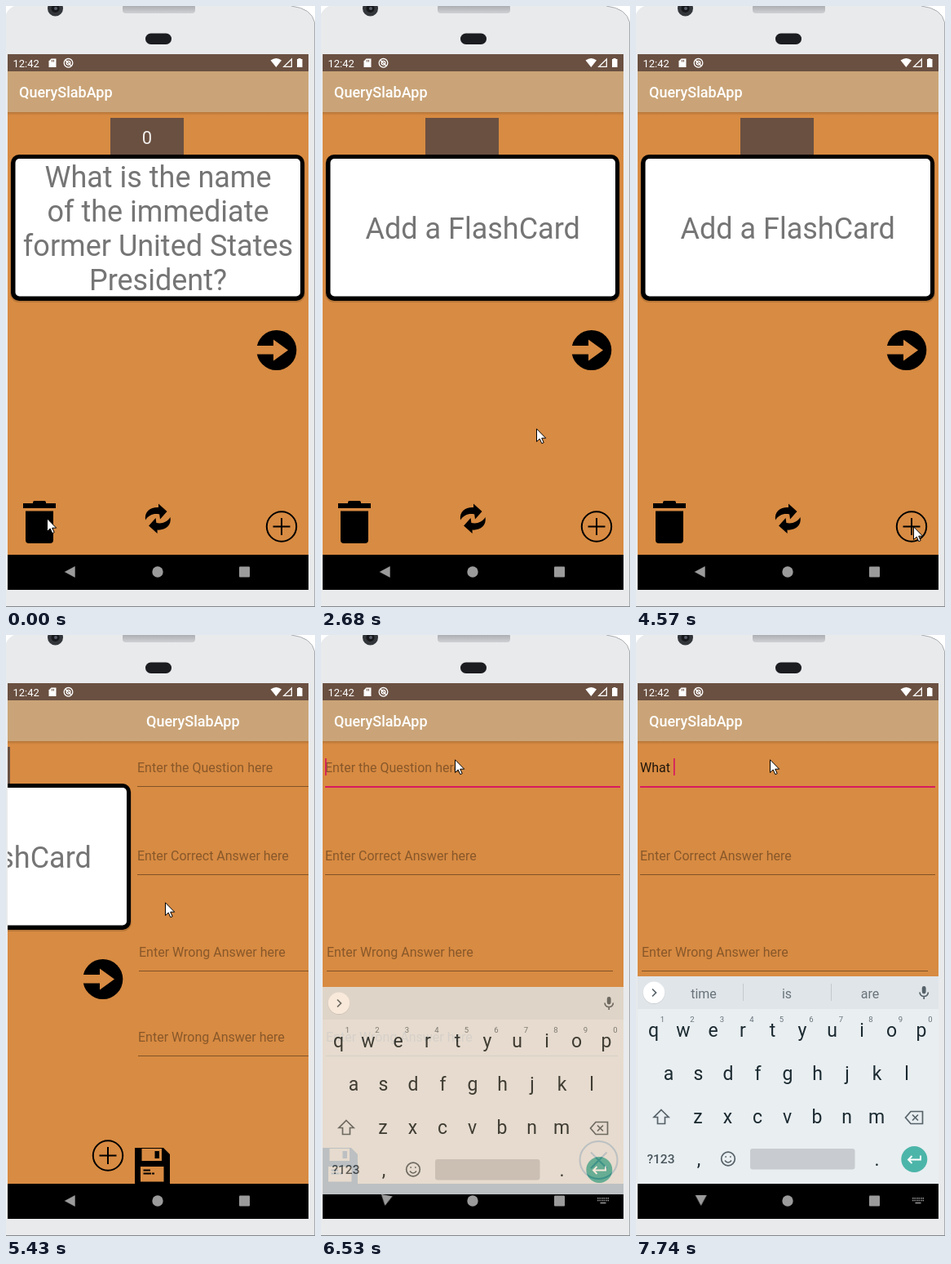
Recreate the animation shown at these times as an HTML page. Size 379 px wide and 736 px high, loop 8000 ms.

```html
<!DOCTYPE html>
<html lang="en">
<head>
<meta charset="utf-8">
<title>Card quiz demo</title>
<style>
html, body { margin: 0; width: 100%; height: 100%; overflow: hidden; background: #fff; }
#stage { display: block; width: 379px; height: 736px; font-family: Roboto, sans-serif; }
text { white-space: pre; }
.mid { text-anchor: middle; }
.bar { font-size: 18px; font-weight: 500; fill: #fff; }
.big { font-size: 36px; fill: #757575; text-anchor: middle; }
.hint { font-size: 16px; fill: rgba(0,0,0,.37); }
.typed { font-size: 16px; fill: #21170c; }
.line { stroke: rgba(0,0,0,.4); }
.ink { fill: none; stroke: #000; stroke-width: 2; }
.key { font-size: 23px; fill: #1b2a31; text-anchor: middle; }
.num { font-size: 9.5px; fill: #68747b; text-anchor: middle; }
.word { font-size: 16px; fill: #68737a; text-anchor: middle; }
.glyph { fill: none; stroke: #566269; stroke-width: 1.7; }

.question, .add, .home, .form, .focus, .caret, .rows, .board, .back, .picker, .cursor {
  animation: 8s step-end infinite;
}
.question { animation-name: question; }
.add { animation-name: add; }
.home { animation-name: home; }
.form { animation-name: form; }
.focus { animation-name: focus; }
.caret { animation-name: caret; }
.rows { animation-name: rows; }
.board { animation-name: board; }
.back { animation-name: back; }
.picker { animation-name: picker; }
.cursor { animation-name: cursor; }

@keyframes question { 0% { opacity: 1 } 5%, 100% { opacity: 0 } }
@keyframes add { 0% { opacity: 0 } 5%, 100% { opacity: 1 } }
@keyframes home {
  0% { transform: translateX(0) }
  66% { transform: translateX(-26px) }
  67.875% { transform: translateX(-213px) }
  69.375% { transform: translateX(-349px) }
  71.375%, 100% { transform: translateX(-380px) }
}
@keyframes form {
  0% { transform: translateX(380px) }
  66% { transform: translateX(343px) }
  67.875% { transform: translateX(156px) }
  69.375% { transform: translateX(20px) }
  71.375%, 100% { transform: translateX(0) }
}
@keyframes focus { 0% { opacity: 0 } 79.75%, 100% { opacity: 1 } }
@keyframes caret {
  0% { transform: translateX(0); opacity: 1 }
  85% { transform: translateX(0); opacity: 0 }
  88.375% { transform: translateX(14.2px); opacity: 1 }
  89.875% { transform: translateX(23px); opacity: 1 }
  91.375% { transform: translateX(31.7px); opacity: 1 }
  92.875% { transform: translateX(36.9px); opacity: 1 }
  96.75%, 100% { transform: translateX(41px); opacity: 1 }
}
/* both the typed text and the suggestions are stacked 40px apart */
@keyframes rows {
  0% { transform: translateY(0) }
  88.375% { transform: translateY(-40px) }
  89.875% { transform: translateY(-80px) }
  91.375% { transform: translateY(-120px) }
  92.875% { transform: translateY(-160px) }
  96.75%, 100% { transform: translateY(-200px) }
}
@keyframes board {
  0% { transform: translateY(13px); opacity: 0 }
  81.625% { transform: translateY(13px); opacity: .81 }
  83.5% { transform: translateY(1px); opacity: .98 }
  85%, 100% { transform: translateY(0); opacity: 1 }
}
@keyframes back {
  0% { transform: rotate(0) }
  81.625% { transform: translate(1px,-1px) rotate(-80deg) }
  83.5% { transform: translate(1px,-1px) rotate(-89deg) }
  85%, 100% { transform: translate(1px,-1px) rotate(-90deg) }
}
@keyframes picker { 0% { opacity: 0 } 81.625%, 100% { opacity: 1 } }
@keyframes cursor {
  0% { transform: translate(50px,627px) }
  10.375% { transform: translate(285px,592px) }
  12.375% { transform: translate(337px,634px) }
  14.125% { transform: translate(338px,641px) }
  15.625% { transform: translate(339px,647px) }
  19.125% { transform: translate(270px,622px) }
  20.625% { transform: translate(184px,628px) }
  23.75% { transform: translate(185px,632px) }
  33.5% { transform: translate(264px,517px) }
  35.375% { transform: translate(296px,470px) }
  36.875% { transform: translate(314px,448px) }
  38.75% { transform: translate(337px,430px) }
  40.625% { transform: translate(339px,430px) }
  47.25% { transform: translate(255px,265px) }
  48.75% { transform: translate(185px,158px) }
  52.25% { transform: translate(281px,472px) }
  54.125% { transform: translate(318px,565px) }
  55.625% { transform: translate(336px,620px) }
  57.125% { transform: translate(340px,637px) }
  66% { transform: translate(310px,545px) }
  67.875% { transform: translate(195px,327px) }
  69.375% { transform: translate(177px,185px) }
  71.375% { transform: translate(170px,142px) }
  73.25% { transform: translate(167px,140px) }
  74.75%, 100% { transform: translate(164px,152px) }
}
</style>
</head>
<body>
<svg id="stage" viewBox="0 0 379 736">
  <defs>
    <clipPath id="screen"><rect x="2" y="59" width="369" height="656"/></clipPath>
    <linearGradient id="shade" x2="0" y2="1">
      <stop stop-opacity=".16"/><stop offset="1" stop-opacity="0"/>
    </linearGradient>
    <linearGradient id="slot" x2="0" y2="1">
      <stop stop-color="#a5a7aa"/><stop offset="1" stop-color="#cfd1d4"/>
    </linearGradient>
    <path id="turn" d="M171 629.5C169.5 619 177 613.5 187 614V609.5L197.5 619 189 628.5 188.2 622.5C181 621 175 623.5 171 629.5Z"/>
  </defs>

  <!-- phone body -->
  <path fill="#e8eaec" d="M0 10Q3 3 10 0H350Q375 3 378 20V735H0Z"/>
  <path fill="none" stroke="#a9acaf" d="M350 0Q375 3 378.500 20V736"/>
  <path stroke="#85888b" d="M0 735.500H379"/>
  <circle cx="60.500" cy="3" r="9.500" fill="#33363a"/>
  <circle cx="60.500" cy="3" r="5" fill="#15171a"/>
  <circle cx="61" cy="3" r="2" fill="#565b66"/>
  <rect x="143" y="-2" width="89" height="11" rx="4" fill="url(#slot)"/>
  <rect x="171" y="33.500" width="32" height="13.500" rx="6.700" fill="#1c1d20"/>

  <g clip-path="url(#screen)">
    <rect x="2" y="59" width="369" height="22" fill="#6a5041"/>
    <rect x="2" y="80" width="369" height="51" fill="#caa478"/>
    <rect x="2" y="130" width="369" height="542" fill="#d88b42"/>
    <rect x="2" y="130" width="369" height="4" fill="url(#shade)"/>

    <!-- status bar -->
    <g fill="#fff">
      <text x="8.500" y="74.500" font-size="13">12:42</text>
      <path d="M55.500 64.500H61.500V75H52.500V67.500Z"/>
      <path d="M324.500 66.500Q331.500 61.500 338 66.500L331.300 75Z"/>
      <path d="M358.500 65V64H361.500V65H363.500V75H357V65Z"/>
    </g>
    <path stroke="#6a5041" d="M56.500 66V68.500M58.500 66V68.500"/>
    <g fill="none" stroke="#fff" stroke-width="1.300">
      <circle cx="76.500" cy="69.800" r="5.300"/>
      <circle cx="76.500" cy="69.800" r="2.400"/>
      <path d="M73 66.300L80 73.300M340.800 74.300H350.300V65Z"/>
    </g>

    <g class="home">
      <text class="bar" x="16" y="112">QuerySlabApp</text>
      <rect x="128" y="137" width="90" height="50" fill="#6a5041"/>
      <rect x="5" y="184" width="362" height="179" rx="11" opacity=".15"/>
      <rect x="6" y="182" width="360" height="179" rx="10"/>
      <rect x="11.500" y="187" width="349.500" height="168.500" rx="5" fill="#fff"/>
      <g class="question">
        <text class="mid" x="173" y="168.500" font-size="22" fill="#f1eeec">0</text>
        <text class="big" x="186.500" y="222">What is the name</text>
        <text class="big" x="186.500" y="264">of the immediate</text>
        <text class="big" x="186.500" y="306">former United States</text>
        <text class="big" x="186.500" y="348">President?</text>
      </g>
      <text class="big add" x="186.200" y="285">Add a FlashCard</text>
      <circle cx="331.800" cy="421.500" r="24.500"/>
      <path fill="#d88b42" d="M306 416H328V408.500L346 421.500 328 434.500V426.500H306Z"/>
      <path d="M33 609V608Q33 606 35 606H47Q49 606 49 608V609H61V615H21V609ZM24 618.500H58V654Q58 658 54 658H28Q24 658 24 654Z"/>
      <use href="#turn"/>
      <use href="#turn" transform="rotate(180 186.300 627.800)"/>
      <circle class="ink" cx="338" cy="637.500" r="18.200"/>
      <path class="ink" d="M327.500 637.500H348.500M338 627V648"/>
    </g>

    <g class="form">
      <text class="bar" x="16" y="112">QuerySlabApp</text>
      <svg x="0" y="146" width="379" height="34">
        <g class="rows" id="typed"><text class="hint" x="5" y="21.500">Enter the Question here</text></g>
      </svg>
      <text class="hint" x="5" y="275.500">Enter Correct Answer here</text>
      <text class="hint" x="7" y="394">Enter Wrong Answer here</text>
      <text class="hint" x="6" y="498">Enter Wrong Answer here</text>
      <path class="line" d="M5 185.500H367M5 293.500H367M7 411.500H358M6 515.500H364"/>
      <g class="focus" fill="#d81b60">
        <rect x="5" y="185" width="362" height="2"/>
        <rect class="caret" x="5" y="151" width="1.700" height="21"/>
      </g>
      <path d="M2 628H37L45 636V672H2Z"/>
      <path fill="#d88b42" d="M10.500 629H35V644H10.500ZM9 651H37.500V669.500H9Z"/>
      <rect x="26.500" y="632" width="5.500" height="9"/>
      <path class="ink" stroke-width="1.500" d="M12.500 655.500H21M12.500 659.500H22M23 659.500H26"/>
      <circle class="ink" cx="340.500" cy="643" r="23"/>
      <path class="ink" d="M331 633.500L350.500 653M350.500 633.500L331 653"/>
    </g>

    <rect x="2" y="672" width="369" height="43"/>

    <g class="board">
      <rect x="2" y="418" width="369" height="254" fill="#e9eef1"/>
      <rect x="2" y="418" width="369" height="40" fill="#e0e5e9"/>
      <circle cx="22" cy="438.500" r="13.500" opacity=".1"/>
      <circle cx="22" cy="437.800" r="13.300" fill="#fff"/>
      <path class="glyph" d="M20 433.500L24.500 438 20 442.500"/>
      <svg x="0" y="418" width="379" height="40"><g class="rows" id="words"></g></svg>
      <rect x="350.800" y="430" width="4.800" height="9.500" rx="2.400" fill="#566269"/>
      <path class="glyph" stroke-width="1.500" d="M348 437.500Q348.500 442.500 353.200 442.500 358 442.500 358.400 437.500M353.200 442.500V446"/>
      <g id="keys"></g>
      <path class="glyph" d="M31 581.500L40 590.500H35.500V598.500H26.500V590.500H22Z"/>
      <path class="glyph" d="M337 583.500H351.500V598.500H337L330.500 591ZM339 587.500L346 594.500M346 587.500L339 594.500"/>
      <text class="mid" x="30.500" y="647" font-size="15.500" font-weight="500" fill="#48555c">?123</text>
      <text class="key" x="77" y="650">,</text>
      <text class="key" x="295.500" y="650">.</text>
      <circle class="glyph" cx="113" cy="641.500" r="8.300"/>
      <path class="glyph" d="M109 643.500Q113 648.500 117 643.500M109.300 639H111M115 639H116.700"/>
      <rect x="140" y="629" width="128.500" height="25.500" rx="3" fill="#c8ccd0"/>
      <circle cx="341.300" cy="642" r="16" fill="#4cb5a9"/>
      <path fill="none" stroke="#fff" stroke-width="1.900" d="M349 637.500V642.500H334M338.500 638L334 642.500 338.500 647"/>
    </g>

    <!-- navigation bar -->
    <g fill="#9b9b9b">
      <g transform="translate(78.700 693)"><path class="back" d="M-7 0L6 -7V7Z"/></g>
      <circle cx="186" cy="693" r="6.700"/>
      <rect x="286" y="686.500" width="13" height="13" rx="1"/>
      <g class="picker" fill="none" stroke="#9b9b9b" stroke-width="1.500" stroke-dasharray="1.500 1">
        <path d="M339 689.800H353.500M339 692.500H353.500"/>
        <path stroke-dasharray="none" d="M342.500 695.500H349.500"/>
      </g>
    </g>
  </g>

  <path class="cursor" fill="#fff" stroke="#000" d="M.5.800V16.500L4.200 13 6.800 18.700 9.200 17.600 6.700 12.200H11.700Z"/>
</svg>
<script>
const put = (parent, tag, attrs, text = '') => {
  const el = document.createElementNS('http://www.w3.org/2000/svg', tag);
  for (const name in attrs) el.setAttribute(name, attrs[name]);
  el.textContent = text;
  parent.append(el);
};
const [typed, words, keys] = ['typed', 'words', 'keys'].map(id => document.getElementById(id));

[['qwertyuiop', 21.5, 492], ['asdfghjkl', 40, 545], ['zxcvbnm', 76, 598]].forEach(([row, x0, y], r) => {
  [...row].forEach((key, i) => {
    const x = x0 + i * 36.5;
    put(keys, 'text', { class: 'key', x, y }, key);
    if (!r) put(keys, 'text', { class: 'num', x: x + 11, y: 474 }, String((i + 1) % 10));
  });
});

const steps = [
  ['W', 'We', 'What', 'Will'],
  ['Wh', 'Who', 'What', 'When'],
  ['Wha', 'Wha', 'What', 'Whatever'],
  ['What', 'What', 'Whats', 'Whatever'],
  ['What ', 'time', 'is', 'are']
];
steps.forEach(([entry, ...guesses], i) => {
  const y = (i + 1) * 40;
  put(typed, 'text', { class: 'typed', x: 5, y: y + 21.5 }, entry);
  guesses.forEach((guess, n) => put(words, 'text', { class: 'word', x: 83 + n * 102, y: y + 26.5 }, guess));
  put(words, 'path', { stroke: '#c3c9ce', d: `M131.500 ${y + 9}v21M239.500 ${y + 9}v21` });
});
</script>
</body>
</html>
```
